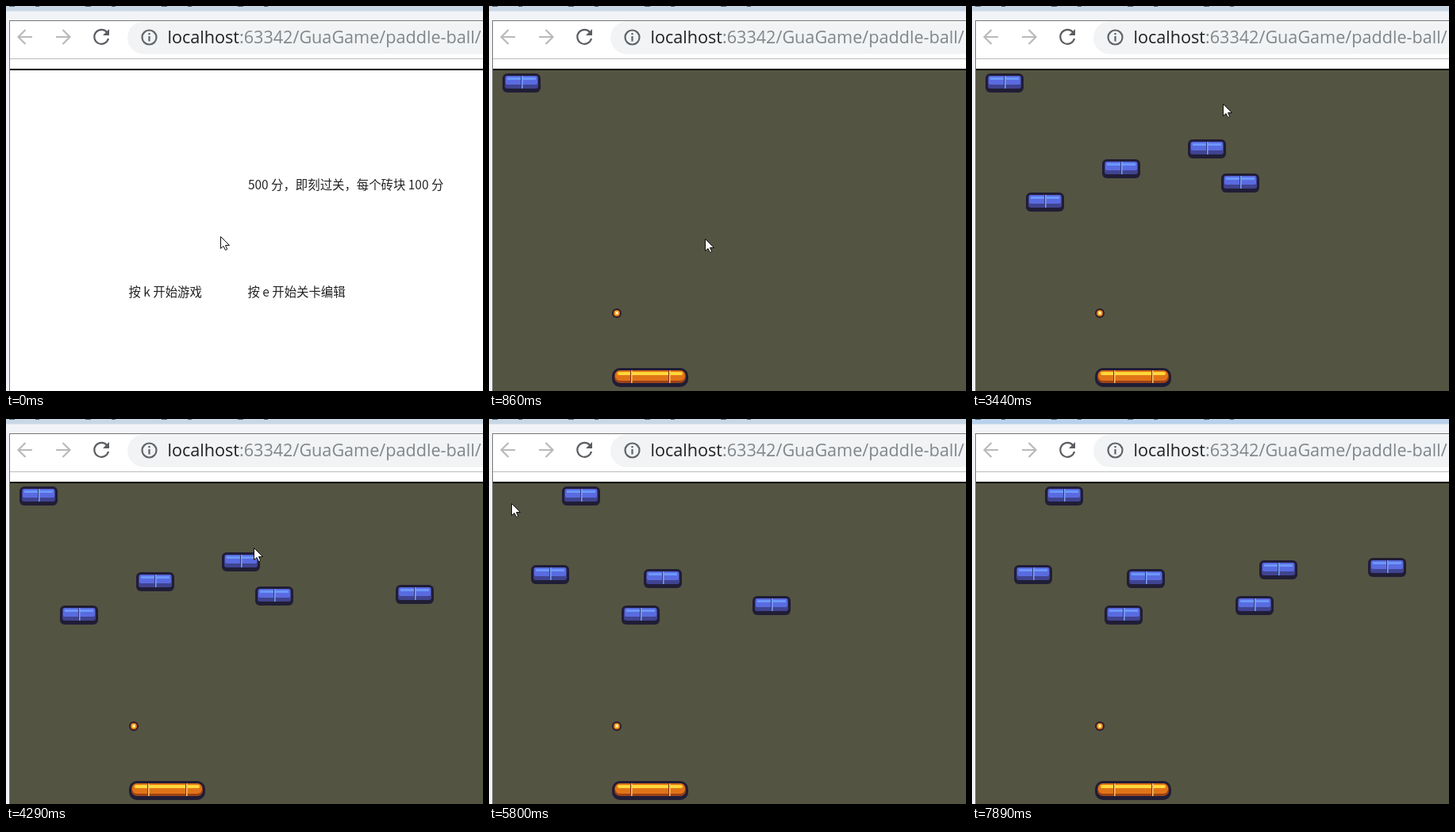
An HTML page for the animation above (7.94 s loop, 601 by 485 pixels).

```html
<!DOCTYPE html>
<html lang="zh-CN">
<head>
<meta charset="utf-8">
<title>paddle-ball</title>
<style>
  html, body { margin: 0; width: 100%; height: 100%; overflow: hidden; background: #fff; }
  svg { display: block; }
  .url { font: 21.6px "Open Sans", "Noto Sans", sans-serif; fill: #80868b; }
  .hint { font: 15.4px "Noto Sans CJK SC", "Noto Sans CJK", sans-serif; fill: #222; }
  .icon { fill: none; stroke-width: 2.2; }
</style>
</head>
<body>
<svg width="601" height="485" viewBox="0 0 601 485">
  <defs>
    <g id="block">
      <rect width="48" height="24" rx="6" fill="#201d36"/>
      <rect x="3" y="3" width="42" height="16" rx="3" fill="#40438f"/>
      <rect x="4" y="3" width="40" height="11" rx="2" fill="#5a6be0"/>
      <rect x="6" y="5" width="36" height="3" fill="#6c98fa"/>
      <rect x="23" y="3" width="1" height="16" fill="#33377c"/>
      <rect x="24" y="3" width="1.5" height="16" fill="#79a4f5"/>
    </g>
    <g id="seam">
      <rect y="3" width="1" height="16" fill="#7a3018"/>
      <rect x="1" y="3" width="1.5" height="16" fill="#ffc766"/>
    </g>
    <g id="paddle">
      <rect width="96" height="24" rx="10" fill="#201d36"/>
      <rect x="3" y="3" width="90" height="16" rx="7" fill="#9c4218"/>
      <rect x="4" y="3" width="88" height="13" rx="6" fill="#e07418"/>
      <rect x="7" y="5" width="82" height="4" rx="2" fill="#ffd83a"/>
      <use href="#seam" x="23"/>
      <use href="#seam" x="71"/>
    </g>
    <g id="ball">
      <circle cx="6" cy="6" r="6" fill="#2b1d2c"/>
      <circle cx="6" cy="6" r="4" fill="#e2791c"/>
      <rect x="4" y="3.5" width="4" height="4.5" fill="#ffd447"/>
      <rect x="5" y="4.5" width="2.5" height="2.5" fill="#fff3b8"/>
    </g>
    <path id="arrow" d="M18 0H1M9.500 -9L.5 0L9.500 9" class="icon" stroke="#bababa"/>
  </defs>

  <!-- browser window -->
  <rect width="601" height="485" fill="#f1f3f6"/>
  <rect id="strip" width="601" height="6.5"/>
  <path d="M4 .5H345" stroke="#58697c" stroke-dasharray="7 26 5 58"/>
  <rect x="4.500" y="18.500" width="610" height="480" fill="#fff" stroke="#777"/>
  <use href="#arrow" x="15" y="39"/>
  <use href="#arrow" transform="translate(81 39) scale(-1 1)"/>
  <path d="M127.500 33.500A9 9 0 1 0 129 41" class="icon" stroke="#5a5d61"/>
  <path d="M130 29V37H122Z" fill="#5a5d61"/>
  <rect x="153" y="19.500" width="500" height="41" rx="20.500" fill="#f1f3f4"/>
  <g class="icon" stroke="#5f6368">
    <circle cx="180.500" cy="39.500" r="9"/>
    <path d="M180.500 38V44.500M180.500 34V36.300"/>
  </g>
  <text x="203.500" y="47" class="url"><tspan fill="#202124">localhost</tspan>:63342/GuaGame/paddle-ball/</text>
  <rect x="5" y="66" width="596" height="1" fill="#b9bbbd"/>
  <rect x="5" y="79" width="596" height="2"/>

  <g id="home" class="hint">
    <text x="305" y="231">500 分，即刻过关，每个砖块 100 分</text>
    <text x="154.500" y="366">按 k 开始游戏</text>
    <text x="304.500" y="366">按 e 开始关卡编辑</text>
  </g>

  <g id="editor">
    <rect x="5" y="81" width="596" height="404" fill="#545442"/>
    <g id="blocks"></g>
    <use href="#ball" x="155" y="381"/>
    <use href="#paddle" x="155" y="456"/>
  </g>

  <path id="cursor" d="M.5 .5V15.500L4 12.500L6.500 17.500L8.700 16.500L6.500 11.500H11.500Z" fill="#fff" stroke="#111"/>
</svg>
<script>
const LOOP = 7940, EDIT = 860, LEVEL2 = 4690, CURSOR_OUT = 7030, STRIP = 7890;

// the cursor moves in ticks: start of each burst and its tick length
const bursts = [
  [0, 310], [310, 120], [860, 152], [1920, 145], [3200, 120],
  [4290, 400], [4690, 145], [5140, 140], [5800, 140], [6880, 150]
];

// cursor waypoints: time, x, y
const path = [
  [0, 270, 290], [430, 272, 293], [860, 272, 293], [1460, 292, 142],
  [1770, 142, 124], [1920, 142, 124], [2210, 36, 150], [2500, 34, 161],
  [2930, 170, 96], [3320, 250, 98], [3440, 316, 123], [3680, 470, 140],
  [3920, 312, 163], [4290, 312, 162], [4830, 312, 162], [4970, 146, 166],
  [5140, 210, 132], [5700, 24, 101], [5800, 28, 106], [6220, 340, 112],
  [6500, 478, 108], [6760, 510, 353], [6880, 565, 452]
];

// time, x, y
const placed = [
  [860, 17, 85], [1460, 314, 211], [1920, 164, 193], [2500, 68, 235],
  [3320, 272, 168], [3700, 491, 209],
  [4690, 92, 85], [4840, 332, 223], [4990, 167, 235], [5280, 195, 189],
  [5670, 53, 184], [6210, 362, 178], [6480, 499, 175]
];

const el = id => document.getElementById(id);
const show = (node, on) => node.setAttribute("display", on ? "inline" : "none");
const lastAt = (list, t) => list.findLastIndex(item => item[0] <= t);

const blocks = placed.map(([start, x, y]) => {
  const node = document.createElementNS("http://www.w3.org/2000/svg", "use");
  node.setAttribute("href", "#block");
  node.setAttribute("x", x);
  node.setAttribute("y", y);
  el("blocks").append(node);
  return { node, start, end: start < LEVEL2 ? LEVEL2 : LOOP };
});

function cursorAt(t) {
  const [start, tick] = bursts[lastAt(bursts, t)];
  const q = start + Math.floor((t - start) / tick) * tick;
  const i = lastAt(path, q);
  const a = path[i], b = path[i + 1] || a;
  const k = b === a ? 0 : (q - a[0]) / (b[0] - a[0]);
  return [1, 2].map(n => Math.round(a[n] + (b[n] - a[n]) * k));
}

function draw(t) {
  el("cursor").setAttribute("transform", `translate(${cursorAt(t)})`);
  show(el("cursor"), t < CURSOR_OUT);
  show(el("home"), t < EDIT);
  show(el("editor"), t >= EDIT);
  for (const b of blocks) show(b.node, t >= b.start && t < b.end);
  el("strip").setAttribute("fill", t < STRIP ? "#c9d7e5" : "#b9d1ea");
}

const origin = performance.now();
function frame() {
  draw((performance.now() - origin) % LOOP);
  requestAnimationFrame(frame);
}
frame();
</script>
</body>
</html>
```
